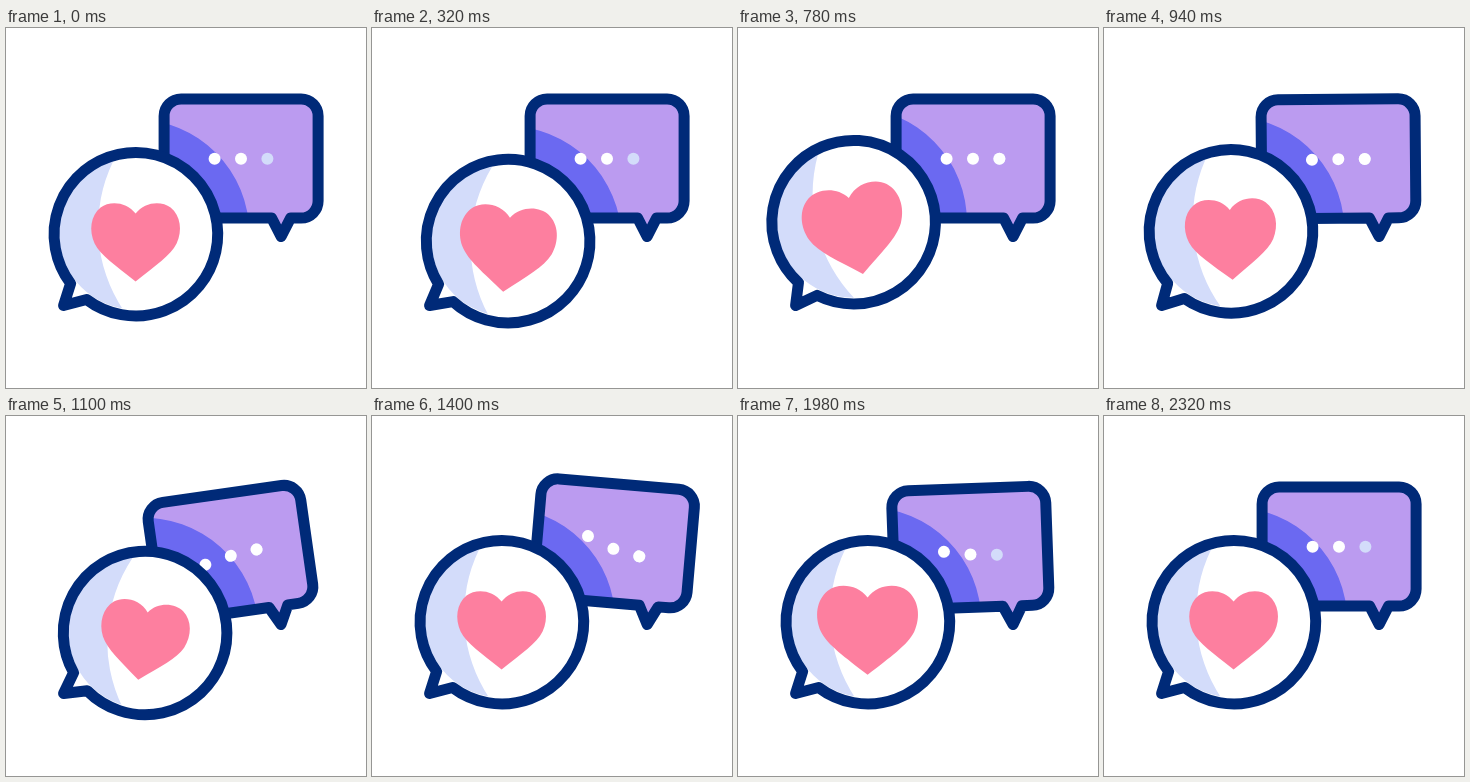
Animation, 360 px wide and 360 px high, one loop 2400 ms. Source, as an HTML page with a canvas:

```html
<!DOCTYPE html>
<html lang="en">
<head>
<meta charset="utf-8">
<title>Chat bubbles</title>
<style>
html, body { margin: 0; width: 100%; height: 100%; overflow: hidden; background: #fff; }
canvas { display: block; }
</style>
</head>
<body>
<canvas id="stage" width="360" height="360"></canvas>
<script>
const ctx = document.getElementById('stage').getContext('2d');
const LOOP = 2400;
const NAVY = '#002a78', LILAC = '#bb9bf0', BLUE = '#6b69f1', PALE = '#d3dcfa', PINK = '#fd7f9f';

const round = new Path2D('M58 278L65 256A81.8 81.8 0 1 1 81 272Z');
const roundInner = new Path2D('M53.5 206a76 76 0 1 0 152 0a76 76 0 1 0-152 0Z');
const crescent = new Path2D('M107.5 134A150 150 0 0 0 118 283H40V134Z');
const shadow = new Path2D('M15.3 206a114.2 114.2 0 1 0 228.4 0a114.2 114.2 0 1 0-228.4 0Z');
const box = new Path2D('M175.5 71.5H295.5a17 17 0 0 1 17 17V173.5a17 17 0 0 1-17 17H285L275.5 209L266 190.5H175.5a17 17 0 0 1-17-17V88.5a17 17 0 0 1 17-17Z');
const heart = new Path2D('M130 186C121 174 104 173 95 180C85 188 83 203 89 216C95 228 110 238 130 254C150 238 165 228 171 216C177 203 175 188 165 180C156 173 139 174 130 186Z');

// Eased track: values are evenly spaced in time, held before and after.
function track(t, start, step, values) {
  const p = Math.min(Math.max((t - start) / step, 0), values.length - 1);
  const i = Math.min(Math.floor(p), values.length - 2);
  const ease = (1 - Math.cos(Math.PI * (p - i))) / 2;
  return values[i] + (values[i + 1] - values[i]) * ease;
}

function about(x, y, degrees, scale = 1) {
  ctx.translate(x, y);
  ctx.rotate(degrees * Math.PI / 180);
  ctx.scale(scale, scale);
  ctx.translate(-x, -y);
}

function layer(draw) {
  ctx.save();
  draw();
  ctx.restore();
}

function fill(path, color) {
  ctx.fillStyle = color;
  ctx.fill(path);
}

function dot(x, y, color) {
  ctx.fillStyle = color;
  ctx.beginPath();
  ctx.arc(x, y, 6, 0, 2 * Math.PI);
  ctx.fill();
}

function draw(t) {
  const roundAngle = track(t, 200, 300, [0, 15, -10.8, 8, 0]);
  const boxAngle = track(t, 900, 300, [0, -10.7, 10, -6, 0]);
  const beat = track(t, 200, 200, [1, 1.14, 1, 1.14, 1, 1, 1, 1.14, 1, 1.14, 1]);
  const glow = track(t, 600, 100, [0, .5, 1, 1, 1, 1, 1, 1, 1, 1, .5, 0]);
  const bounce = i => track(t, 900 + 100 * i, 300, [0, 10.5, -10.5, 7.5, 0]);
  const turnRound = () => about(58, 278, roundAngle);
  const turnBox = () => about(275.5, 209.5, boxAngle);

  ctx.fillStyle = '#fff';
  ctx.fillRect(0, 0, 361, 361);

  // The shadow follows the round bubble but stays inside the box.
  layer(() => {
    layer(() => {
      turnBox();
      fill(box, LILAC);
    });
    const clip = new Path2D();
    clip.addPath(box, new DOMMatrix().translate(275.5, 209.5).rotate(boxAngle).translate(-275.5, -209.5));
    ctx.clip(clip);
    turnRound();
    fill(shadow, BLUE);
  });

  layer(() => {
    turnBox();
    ctx.stroke(box);
    for (let i = 0; i < 3; i++) dot(209 + 26.4 * i, 131.3 + bounce(i), i < 2 ? '#fff' : PALE);
    ctx.globalAlpha = glow;
    dot(261.8, 131.3 + bounce(2), '#fff');
  });

  layer(() => {
    turnRound();
    fill(round, '#fff');
    layer(() => {
      ctx.clip(roundInner);
      fill(crescent, PALE);
    });
    ctx.stroke(round);
    about(130, 215, 0, beat);
    fill(heart, PINK);
  });
}

function frame() {
  draw(performance.now() % LOOP);
  requestAnimationFrame(frame);
}

ctx.translate(-.4, -.5);
ctx.lineWidth = 11;
ctx.lineJoin = 'round';
ctx.strokeStyle = NAVY;
frame();
</script>
</body>
</html>
```
